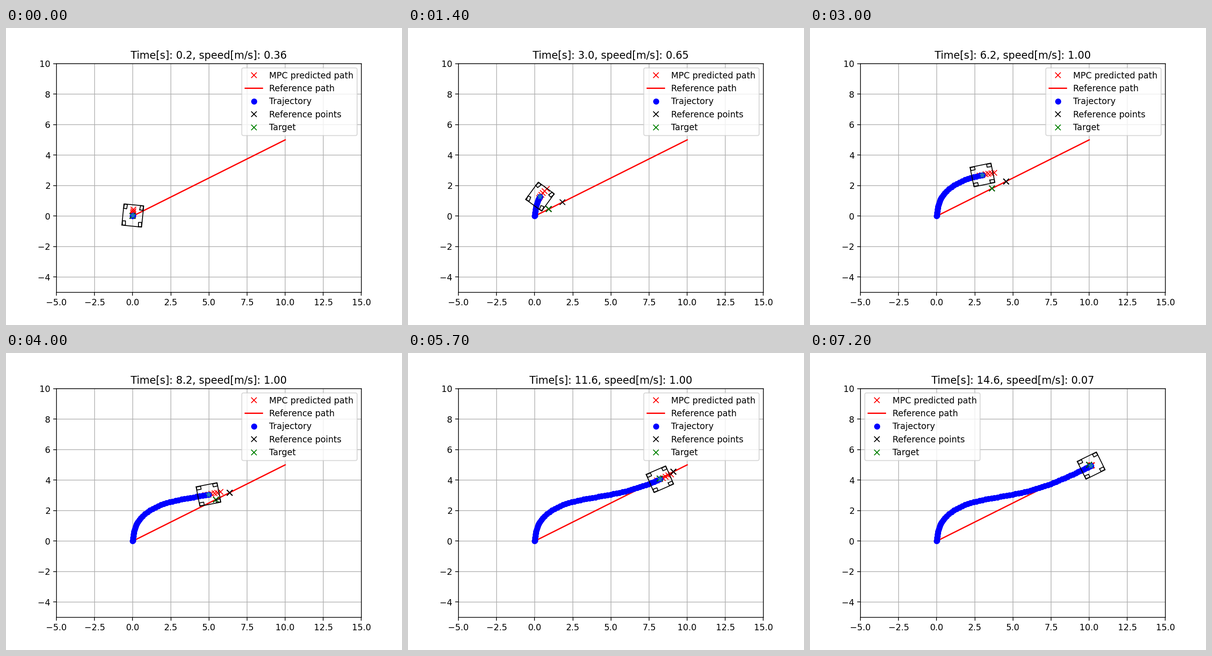
Write a matplotlib script that moves like this. It is 864 px wide and 648 px high and loops after 7.3 s.

```python
import numpy as np
import matplotlib.pyplot as plt
from matplotlib.animation import FuncAnimation

FRAMES, DT, HORIZON = 73, 0.2, 5
LENGTH, WIDTH = 1.4, 1.3
AXLE, TREAD = 0.545, 0.53
WHEEL_LEN, WHEEL_WIDTH = 0.14, 0.1
STOP_TIME = 14.6

plt.rcParams.update({"font.family": "DejaVu Sans", "path.snap": False})


def step(t, middle, width):
    return 1 / (1 + np.exp((middle - t) / width))


def speed(t):
    """Launch, ease off while turning, speed up to cruise, brake to a stop."""
    turning = np.minimum(0.2 + 0.8 * t, 0.578 - 0.07 * t)
    cruise = np.clip(0.8 * t - 1.75, turning, 1)
    braking = 0.07 + 0.466 * np.maximum(STOP_TIME - t, 0) ** 0.83
    return np.minimum(cruise, braking)


def heading(t):
    """Swing right towards the line, then back left to run along it."""
    return np.radians(88 - 82.2 * step(t, 3.35, 1.03) + 20.6 * step(t, 9.6, 1.1))


def rect(half_len, half_width):
    return np.array([[-1, 1, 1, -1, -1], [1, 1, -1, -1, 1]]) * [[half_len], [half_width]]


def rotate(shape, angle):
    c, s = np.cos(angle), np.sin(angle)
    return np.array([[c, -s], [s, c]]) @ shape


t = np.arange(FRAMES + HORIZON + 1) * DT
v, yaw = speed(t), heading(t)
steer = np.arctan(np.gradient(yaw, DT) * AXLE / v)
moves = v * DT * np.array([np.cos(yaw), np.sin(yaw)])
pos = np.cumsum(moves, axis=1) - moves
course = np.array([np.linspace(0, 10, 12), np.linspace(0, 5, 12)])
last = course.shape[1] - 1

fig, ax = plt.subplots(figsize=(6.4, 4.8), dpi=135)
ax.set_aspect("equal")
ax.set(xlim=(-5, 15), ylim=(-5, 10), xticks=np.arange(-5, 15.1, 2.5),
       yticks=range(-4, 11, 2))
ax.grid(True)
title = ax.set_title("")

plan, = ax.plot([], [], "xr", label="MPC predicted path")
ax.plot(*course, "-r", label="Reference path")
trail, = ax.plot([], [], "ob", label="Trajectory")
refs, = ax.plot([], [], "xk", label="Reference points")
target, = ax.plot([], [], "xg", label="Target")
body, = ax.plot([], [], "-k", lw=1)
corners = [(x, y) for x in (AXLE, -AXLE) for y in (TREAD, -TREAD)]
wheels = [ax.plot([], [], "-k", lw=1)[0] for _ in corners]
center, = ax.plot([], [], "*", color="C0")
legend = ax.legend(loc="upper right")


def draw(i):
    k = i + 1
    here = pos[:, k:k + 1]
    title.set_text(f"Time[s]: {t[k]:.1f}, speed[m/s]: {v[k]:.2f}")
    plan.set_data(*pos[:, k - 1:k + HORIZON])
    trail.set_data(*pos[:, :k + 1])

    near = np.argmin(np.hypot(*(course - pos[:, k - 1:k])))
    ahead = np.rint(v[k - 1] * DT * np.arange(HORIZON + 2)).astype(int)
    refs.set_data(*course[:, np.minimum(near + ahead, last)])
    target.set_data(*course[:, near:near + 1])

    body.set_data(*(rotate(rect(LENGTH / 2, WIDTH / 2), yaw[k]) + here))
    for line, (cx, cy) in zip(wheels, corners):
        # front and rear wheels steer in opposite directions
        wheel = rotate(rect(WHEEL_LEN, WHEEL_WIDTH), np.sign(cx) * steer[k])
        line.set_data(*(rotate(wheel + [[cx], [cy]], yaw[k]) + here))
    center.set_data(*here)

    # the legend makes way once the cart nears the end of the line
    legend.set_loc("upper left" if t[k] > 12.9 else "upper right")


anim = FuncAnimation(fig, draw, frames=FRAMES, interval=100,
                     init_func=lambda: None, repeat=True, repeat_delay=0)
plt.show()
```
